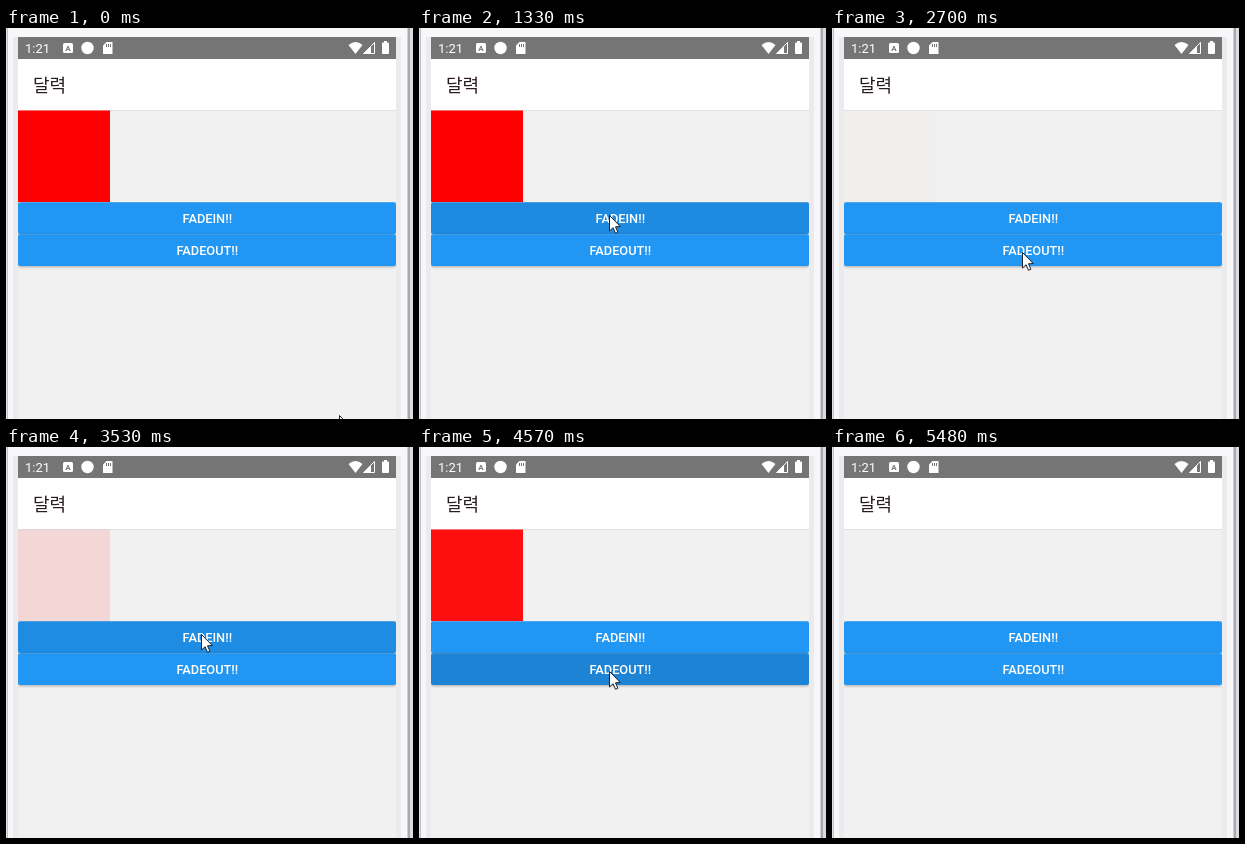
Recreate the animation shown at these times as an HTML page with a canvas. Size 407 by 391 pixels, loop 5.82 s.

```html
<!DOCTYPE html>
<html lang="ko">
<head>
<meta charset="utf-8">
<title>Fade demo</title>
<style>
  html, body { margin: 0; width: 100%; height: 100%; overflow: hidden; background: #f0f0f0; }
  canvas { display: block; }
</style>
</head>
<body>
<canvas id="stage" width="407" height="391"></canvas>
<script>
const ctx = document.getElementById('stage').getContext('2d');
const LOOP = 5820;
const BLUE = '#2196f3';
const LABEL = '500 12.8px Roboto, sans-serif';
const screen = { x: 12, w: 378 };
const fadeInButton = { text: 'FADEIN!!', y: 174 };
const fadeOutButton = { text: 'FADEOUT!!', y: 206 };

const presses = [
  { button: fadeInButton, at: 985, x: 191 },
  { button: fadeOutButton, at: 1675, x: 191 },
  { button: fadeInButton, at: 3170, x: 196 },
  { button: fadeOutButton, at: 4285, x: 191 }
];

// Cursor tip: time, x, y
const cursorPath = [
  [0, 333, 387], [70, 329, 376], [210, 285, 295], [350, 208, 176],
  [430, 184, 149], [510, 186, 174], [580, 190, 187],
  [1345, 190, 187], [1455, 190, 224],
  [2775, 190, 224], [2975, 195, 187],
  [3600, 195, 187], [3740, 191, 212], [3815, 190, 226], [3900, 190, 224],
  [5010, 190, 224], [5430, 339, 393]
];

const clamp = v => Math.min(1, Math.max(0, v));
const smooth = p => p * p * (3 - 2 * p);

// cubic-bezier(.42, 0, 1, 1), solved by bisection
function easeIn(x) {
  let low = 0, high = 1;
  for (let i = 0; i < 20; i++) {
    const s = (low + high) / 2;
    const bx = 1.26 * (1 - s) ** 2 * s + 3 * (1 - s) * s * s + s ** 3;
    if (bx < x) low = s; else high = s;
  }
  return smooth(low);
}

function fade(t, start) {
  const p = clamp((t - start) / 1000);
  return p < 0.5 ? easeIn(2 * p) / 2 : 1 - easeIn(2 - 2 * p) / 2;
}

function squareAlpha(t) {
  if (t < 3180) return Math.max(0.01, 1 - fade(t, 1755));
  if (t < 4400) return fade(t, 3327);
  return 1 - fade(t, 4426);
}

function cursorAt(t) {
  const i = cursorPath.findIndex(k => k[0] > t);
  if (i < 1) return null;
  const [t0, x0, y0] = cursorPath[i - 1], [t1, x1, y1] = cursorPath[i];
  const p = (t - t0) / (t1 - t0);
  return [x0 + (x1 - x0) * p, y0 + (y1 - y0) * p];
}

function rect(color, x, y, w, h) {
  ctx.fillStyle = color;
  ctx.fillRect(x, y, w, h);
}

function rounded(x, y, w, h, r) {
  ctx.beginPath();
  ctx.roundRect(x, y, w, h, r);
}

function polygon(...points) {
  ctx.beginPath();
  points.forEach(([x, y]) => ctx.lineTo(x, y));
  ctx.closePath();
}

function text(string, x, y, font, color, align = 'left') {
  ctx.font = font;
  ctx.fillStyle = color;
  ctx.textAlign = align;
  ctx.fillText(string, x, y);
}

function drawFrame() {
  rect('#f0f0f0', 0, 0, 407, 391);
  rect('#f8f7f9', 0, 0, 407, 9);
  rect('#ebeaed', 2, 9, 10, 382);
  rect('#ebeaed', 390, 9, 11, 382);
  rect('#f7f6f8', 2, 0, 5, 391);
  rect('#f7f6f8', 395, 0, 6, 391);
  rect('#e4e2e8', 0, 0, 1, 391);
  rect('#c3c0c9', 1, 0, 1, 391);
  rect('#d2d0d6', 401, 0, 1, 391);
  rect('#aaa7ae', 402, 0, 2, 391);
  rect('#dddbe0', 404, 0, 3, 391);
}

function drawStatusBar() {
  const gray = '#757575';
  rect(gray, screen.x, 9, screen.w, 22);
  text('1:21', 19, 25, '400 13px Roboto, sans-serif', '#fff');
  ctx.fillStyle = '#fff';
  rounded(57, 15, 10, 10, 1.5);
  ctx.fill();
  text('A', 62, 23, '700 8px Roboto, sans-serif', gray, 'center');

  ctx.fillStyle = '#fff';
  ctx.beginPath();
  ctx.arc(81.5, 20, 6.2, 0, 7);
  ctx.fill();

  polygon([100.5, 14], [106.5, 14], [106.5, 26], [97, 26], [97, 17.5]);
  ctx.fill();
  [100, 102, 104].forEach(x => rect(gray, x, 16, 1, 3));

  ctx.fillStyle = '#fff';
  ctx.beginPath();
  ctx.moveTo(349.5, 26);
  ctx.lineTo(342.5, 17);
  ctx.quadraticCurveTo(349.5, 11, 356.5, 17);
  ctx.fill();

  ctx.strokeStyle = '#fff';
  ctx.lineWidth = 1;
  polygon([368.5, 14.5], [368.5, 25.5], [357.8, 25.5]);
  ctx.stroke();
  polygon([365, 18], [365, 26], [357, 26]);
  ctx.fill();

  rounded(376, 14.5, 7, 11.5, 1);
  ctx.fill();
  rect('#fff', 378, 13, 3, 2);
}

function drawContent(t) {
  rect('#f1f1f1', screen.x, 82, screen.w, 309);
  rect('#fff', screen.x, 31, screen.w, 51);
  rect('#e2e2e2', screen.x, 82, screen.w, 1);
  text('달력', 27, 64, '400 18px "Noto Sans CJK KR", "Noto Sans CJK", sans-serif', '#291c20');
  ctx.globalAlpha = squareAlpha(t);
  rect('#f00', screen.x, 82.5, 92, 91.5);
  ctx.globalAlpha = 1;
}

function drawRipple(press, t) {
  const age = t - press.at;
  if (age < 0 || age > 440) return;
  const strength = 0.14 * clamp(age / 75) * (1 - clamp((age - 275) / 160));
  const radius = 20 + 185 * Math.sqrt(clamp(age / 225));
  ctx.fillStyle = `rgba(0,0,0,${strength})`;
  ctx.beginPath();
  ctx.arc(press.x, press.button.y + 16, radius, 0, 7);
  ctx.fill();
}

function drawButton(button, t) {
  ctx.save();
  ctx.shadowColor = 'rgba(0,0,0,.3)';
  ctx.shadowBlur = 3;
  ctx.shadowOffsetY = 1;
  ctx.fillStyle = BLUE;
  rounded(screen.x, button.y + 0.2, screen.w, 31.8, 2);
  ctx.fill();
  ctx.shadowColor = 'transparent';
  ctx.clip();
  presses.filter(p => p.button === button).forEach(p => drawRipple(p, t));
  ctx.restore();
  text(button.text, 201.3, button.y + 21.3, LABEL, '#fff', 'center');
}

function drawCursor(t) {
  const tip = cursorAt(t);
  if (!tip) return;
  ctx.save();
  ctx.translate(Math.round(tip[0]) + 0.5, Math.round(tip[1]) + 0.5);
  polygon([0, 0], [0, 15.5], [3.6, 12.2], [6, 17.8], [8.4, 16.8], [6, 11.3], [10.8, 11]);
  ctx.fillStyle = '#fff';
  ctx.strokeStyle = '#20232b';
  ctx.lineWidth = 1;
  ctx.fill();
  ctx.stroke();
  ctx.restore();
}

function draw(t) {
  drawFrame();
  drawContent(t);
  drawStatusBar();
  ctx.save();
  ctx.beginPath();
  ctx.rect(screen.x, 174, screen.w, 217);
  ctx.clip();
  drawButton(fadeInButton, t);
  drawButton(fadeOutButton, t);
  ctx.restore();
  drawCursor(t);
}

const start = performance.now();
function tick() {
  draw((performance.now() - start) % LOOP);
  requestAnimationFrame(tick);
}
tick();
</script>
</body>
</html>
```
